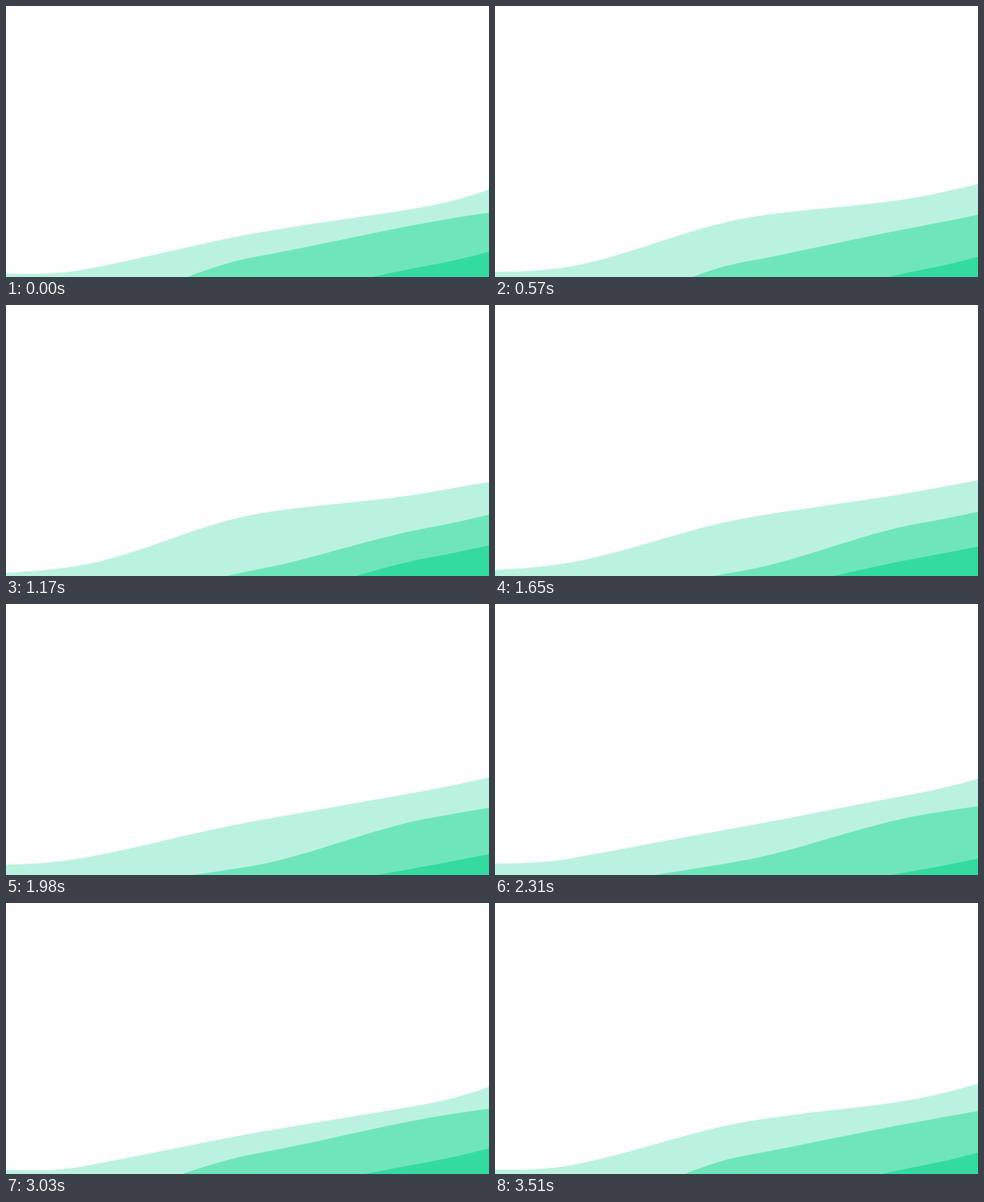
Recreate the animation shown at these times as an HTML page with a canvas. Size 640 by 360 pixels, loop 3.54 s.

```html
<!DOCTYPE html>
<html lang="en">
<head>
<meta charset="utf-8">
<title>Green waves</title>
<style>
  html, body { margin: 0; width: 100%; height: 100%; overflow: hidden; background: #fefefe; }
  canvas { display: block; }
</style>
</head>
<body>
<canvas id="stage" width="640" height="360"></canvas>
<script>
const LOOP = 3540;
const SWELL = 3200;   // ms for one rise and fall
const TILT = -0.18;   // slope of the whole scene
const SPACING = 230;  // distance between crests and troughs

// Each knot swings around a resting height: [rest, cosine part, sine part].
const waves = [
  { color: '#bbf2df', start: -130, ripple: 3,
    knots: [[336, -3, 6], [362.5, 4, 3], [349.5, 9.5, -10], [355.3, 9, -1.5], [342, -4, 6]] },
  { color: '#6fe6ba', start: 100, ripple: 1,
    knots: [[417, 6, 19], [402, -10, 3], [389.5, -2, 7], [389, 4, -1]] },
  { color: '#34dba0', start: 330, ripple: -7,
    knots: [[454, 4, 10], [446, 5, -3], [437, 0, -6]] }
];

const ctx = document.getElementById('stage').getContext('2d');

function drawWave({ color, start, ripple, knots }, phase) {
  const shared = ripple * Math.cos(2 * phase + 0.7);
  const heights = knots.map(([rest, c, s]) =>
    rest + c * Math.cos(phase) + s * Math.sin(phase) + shared);
  let x = start;
  ctx.fillStyle = color;
  ctx.beginPath();
  ctx.moveTo(x, 700);
  ctx.lineTo(x, heights[0]);
  for (let i = 1; i < heights.length; i++) {
    const from = heights[i - 1], to = heights[i];
    ctx.bezierCurveTo(x + SPACING / 3, from, x + SPACING * 2 / 3, to, x + SPACING, to);
    x += SPACING;
  }
  ctx.lineTo(x, 700);
  ctx.fill();
}

function draw() {
  const phase = performance.now() % LOOP / SWELL * 2 * Math.PI;
  ctx.setTransform(1, 0, 0, 1, 0, 0);
  ctx.fillStyle = '#fefefe';
  ctx.fillRect(0, 0, 640, 360);
  ctx.setTransform(1, TILT, 0, 1, 0, 0);
  waves.forEach(wave => drawWave(wave, phase));
  requestAnimationFrame(draw);
}
draw();
</script>
</body>
</html>
```
